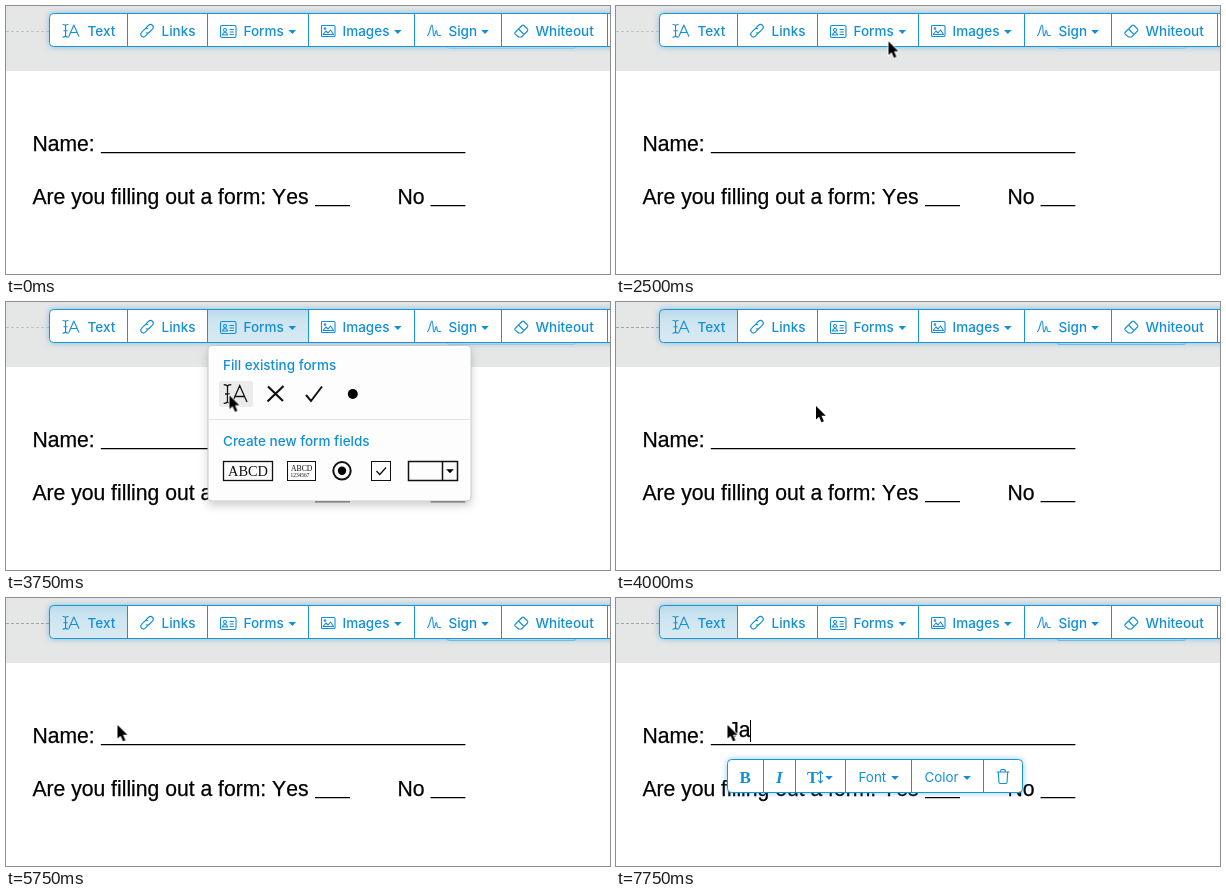
These frames come from a looping animation (604x268 px, 8 s). An HTML page:

```html
<!DOCTYPE html>
<html lang="en">
<head>
<meta charset="utf-8">
<title>Filling out a form</title>
<style>
  html, body { margin: 0; height: 100%; overflow: hidden; background: #fff; }
  svg { display: block; width: 100vw; height: 100vh; }

  .ui { font: 500 13.5px Inter, Roboto, sans-serif; fill: #128fd6; }
  .ui.sub { font-weight: 400; font-size: 13.4px; }
  .doc { font: 21.15px "Liberation Sans", Arial, sans-serif; font-kerning: none; white-space: pre; }
  .doc text { stroke: #000; stroke-width: .25; }
  .serif { font-family: "Liberation Serif", Times, serif; fill: #128fd6; }
  .line { fill: none; stroke: #128fd6; stroke-width: 1.1; stroke-linejoin: round; stroke-linecap: round; }
  .edge { fill: none; stroke: #1a95d8; }
  .dark { fill: none; stroke: #111; stroke-width: 1.3; }
  .glow { filter: drop-shadow(0 0 3px rgba(40, 155, 220, .6)); }
  .shade { filter: drop-shadow(0 4px 5px rgba(0, 0, 0, .2)); }
  #beam path { vector-effect: non-scaling-stroke; }

  /* every change is a hard cut on an 8 s clock */
  .cut { opacity: 0; animation: 8s step-end infinite; }
  .hover { animation-name: hover; }
  .pressed { animation-name: pressed; }
  .menu { animation-name: menu; }
  .pick { animation-name: pick; }
  .tool { animation-name: tool; }
  .edit { animation-name: edit; }
  .hint { animation-name: hint; }
  .key1 { animation-name: key1; }
  .key2 { animation-name: key2; }
  .pointer { animation: pointer 8s step-end infinite; }

  @keyframes hover { 0% { opacity: 0 } 34.375% { opacity: 1 } 37.5%, 100% { opacity: 0 } }
  @keyframes pressed { 0% { opacity: 0 } 37.5% { opacity: 1 } 50%, 100% { opacity: 0 } }
  @keyframes menu { 0% { opacity: 0 } 34.375% { opacity: 1 } 50%, 100% { opacity: 0 } }
  @keyframes pick { 0% { opacity: 0 } 43.75% { opacity: 1 } 50%, 100% { opacity: 0 } }
  @keyframes tool { 0% { opacity: 0 } 50%, 100% { opacity: 1 } }
  @keyframes edit { 0% { opacity: 0 } 78.125%, 100% { opacity: 1 } }
  @keyframes hint { 0% { opacity: 0 } 78.125% { opacity: 1 } 93.75%, 100% { opacity: 0 } }
  @keyframes key1 { 0% { opacity: 0 } 93.75% { opacity: 1 } 96.875%, 100% { opacity: 0 } }
  @keyframes key2 { 0% { opacity: 0 } 96.875%, 100% { opacity: 1 } }

  @keyframes pointer {
    0% { transform: translate(-40px, -40px) }
    6.25% { transform: translate(306px, 74px) }
    9.375% { transform: translate(296px, 78px) }
    12.5% { transform: translate(272px, 45px) }
    15.625% { transform: translate(272.5px, 35.5px) }
    40.625% { transform: translate(228.5px, 77px) }
    43.75% { transform: translate(223.5px, 92px) }
    46.875% { transform: translate(223.5px, 93.5px) }
    50% { transform: translate(200px, 104px) }
    53.125% { transform: translate(150px, 120px) }
    56.25% { transform: translate(117.5px, 137.5px) }
    59.375% { transform: translate(112px, 130px) }
    65.625% { transform: translate(112px, 129.5px) }
    71.875%, 100% { transform: translate(111.5px, 127px) }
  }
</style>
</head>
<body>
<svg viewBox="0 0 604 268" preserveAspectRatio="none">
  <defs>
    <linearGradient id="press" x2="0" y2="1">
      <stop offset="0" stop-color="#b9d9ea"/>
      <stop offset=".3" stop-color="#cce4f0"/>
      <stop offset="1" stop-color="#d8eaf3"/>
    </linearGradient>
    <path id="caret" d="M0 0H7.6L3.8 4Z"/>
    <g id="beam">
      <path d="M.7 .7C3 .7 4.5 1 4.5 3V17C4.5 19 3 19.3 .7 19.3M8.3 .7C6 .7 4.5 1 4.5 3M8.3 19.3C6 19.3 4.5 19 4.5 17M2 10H7M9.5 18L16.7 1.5L24 18M12 12.5H21.5"/>
    </g>
  </defs>

  <!-- page -->
  <rect width="604" height="268" fill="#fff"/>
  <rect width="604" height="65" fill="#e5e6e6"/>
  <path d="M0 25.5H43" stroke="#c3c3c3" stroke-dasharray="3 2"/>
  <path d="M441 41.5Q442 42.5 445 42.5H566Q569 42.5 570 41.5" fill="none" stroke="#b4d3e5"/>
  <g class="cut tool">
    <path d="M0 25.5H43" stroke="#a2a4a5" stroke-dasharray="3 2"/>
    <path d="M441 41.5Q442 42.5 445 42.5H566Q569 42.5 570 41.5" fill="none" stroke="#84bfe2"/>
  </g>

  <g class="doc">
    <text x="26.4" y="145">Name:</text>
    <text x="26.4" y="198">Are you filling out a form: Yes</text>
    <text x="391.5" y="198">No</text>
    <path d="M94.8 146.6H459.4M309 199.6H344M424.5 199.6H459.4" stroke="#000" stroke-width="1.4"/>
  </g>

  <!-- main toolbar -->
  <rect class="glow" x="43.5" y="7.5" width="580" height="33" rx="4" fill="#fff"/>
  <path class="cut tool" d="M121.5 7.5H47.5Q43.5 7.5 43.5 11.5V36.5Q43.5 40.5 47.5 40.5H121.5Z" fill="url(#press)"/>
  <rect class="cut hover" x="201.5" y="7.5" width="101" height="33" fill="#e4eff5"/>
  <rect class="cut pressed" x="201.5" y="7.5" width="101" height="33" fill="url(#press)"/>
  <rect class="edge" x="43.5" y="7.5" width="580" height="33" rx="4"/>
  <path class="edge" d="M121.5 8V40M201.5 8V40M302.5 8V40M408.5 8V40M495.5 8V40M601.5 8V40"/>

  <g class="line">
    <use href="#beam" transform="translate(56.5 18) scale(.68)"/>
    <g transform="translate(141 24.7) rotate(-45)">
      <path d="M1.5 -2.7H5A2.7 2.7 0 0 1 5 2.7H.5A2.7 2.7 0 0 1 -2 1"/>
      <path d="M-1.5 2.7H-5A2.7 2.7 0 0 1 -5 -2.7H-.5A2.7 2.7 0 0 1 2 -1"/>
    </g>
    <rect x="214.5" y="19.5" width="15.5" height="12" rx="1.5"/>
    <circle cx="219" cy="24" r="1.5"/>
    <path d="M216.5 29Q217 26.5 219 26.5T221.5 29ZM224 23.5H227.5M224 26H227.5M224 28.5H227.5"/>
    <rect x="315.5" y="19.5" width="13.5" height="11" rx="1"/>
    <path d="M317 28.5L320 25L322 27L324.5 24L327.5 28.5Z"/>
    <circle cx="319" cy="22.5" r=".8"/>
    <path d="M421.5 29.5C423.5 29 424.5 19 426 19S426.5 30 428 30S429 24.5 430.3 24.5S430.5 29.5 432 29.5H434.5"/>
    <path d="M509 26.5L516 19.5Q517 18.7 518 19.5L521.5 23Q522.3 24 521.5 25L515.5 31H512.5L509 27.8Q508.5 27 509 26.5ZM512.5 23L518 28.5"/>
  </g>
  <g class="ui">
    <text x="81.5" y="30">Text</text>
    <text x="155.5" y="30">Links</text>
    <text x="237.5" y="30">Forms</text>
    <text x="336.5" y="30">Images</text>
    <text x="442.5" y="30">Sign</text>
    <text x="529.5" y="30">Whiteout</text>
    <use href="#caret" x="282.5" y="24"/>
    <use href="#caret" x="388" y="24"/>
    <use href="#caret" x="475.2" y="24"/>
  </g>

  <!-- forms menu -->
  <g class="cut menu">
    <rect class="shade" x="202" y="44" width="263" height="155.3" rx="4" fill="#fff"/>
    <rect x="202" y="43.5" width="263" height="155.5" rx="4" fill="#fdfdfd" stroke="#c9cccd"/>
    <path d="M203 117.5H464" stroke="#e3e3e3"/>
    <g class="ui">
      <text x="217" y="68">Fill existing forms</text>
      <text x="217" y="144">Create new form fields</text>
    </g>
    <rect class="cut pick" x="213" y="79" width="34" height="26" rx="2" fill="#ebebeb"/>
    <g class="dark">
      <use href="#beam" x="217" y="82"/>
      <path d="M262 84.5L277 99M277.5 84L261.5 99.5" stroke-width="2.2"/>
      <path d="M300 93L305 99L316 84.5" stroke-width="2"/>
      <rect x="217.5" y="159.5" width="49" height="19"/>
      <rect x="281.5" y="159.5" width="28" height="19" stroke-width="1"/>
      <circle cx="336" cy="168.8" r="8.7" stroke-width="2"/>
      <rect x="365.5" y="159.5" width="19" height="19" stroke-width="1"/>
      <path d="M370.5 169L373.8 172.5L380 165.5"/>
      <path d="M402.5 159.5H451.5V178.5H402.5ZM436.5 159.5V178.5" stroke-width="1.5"/>
    </g>
    <circle cx="346.8" cy="92" r="5"/>
    <circle cx="336" cy="168.8" r="4.2"/>
    <use href="#caret" x="440.2" y="167.3"/>
    <g class="serif" style="fill:#111">
      <text x="222" y="174.3" font-size="14.4">ABCD</text>
      <text x="285" y="169.3" font-size="7.7">ABCD</text>
      <text x="284.5" y="175" font-size="5.4">1234567</text>
    </g>
  </g>

  <!-- text being edited -->
  <g class="doc">
    <g class="cut hint">
      <rect x="113" y="122" width="133" height="22" fill="#9bc8ef"/>
      <text x="112.6" y="139">Type your text</text>
    </g>
    <g class="cut key1">
      <text x="112.3" y="139">J</text>
      <path d="M123.5 122V144" stroke="#000"/>
    </g>
    <g class="cut key2">
      <text x="112.3" y="139">Ja</text>
      <path d="M134.5 122V144" stroke="#000"/>
    </g>
  </g>

  <!-- formatting bar -->
  <g class="cut edit">
    <rect class="glow" x="111.5" y="161.5" width="295" height="33" rx="4" fill="#fff"/>
    <rect class="edge" x="111.5" y="161.5" width="295" height="33" rx="4"/>
    <path class="edge" d="M147.5 162V194M179.5 162V194M229.5 162V194M295.5 162V194M367.5 162V194"/>
    <g class="serif" font-size="17">
      <text x="123.5" y="185" font-weight="bold">B</text>
      <text x="160" y="185" font-style="italic" font-weight="bold">I</text>
      <text x="191" y="185" font-size="16.5" font-weight="bold">T</text>
    </g>
    <path class="line" d="M204.5 174V184M202.5 175.5L204.5 173.2L206.5 175.5M202.5 182.7L204.5 185L206.5 182.7"/>
    <g class="ui sub">
      <text x="242.5" y="184">Font</text>
      <text x="308.5" y="184">Color</text>
      <use href="#caret" x="209.2" y="178"/>
      <use href="#caret" x="275.2" y="178"/>
      <use href="#caret" x="347.2" y="178"/>
    </g>
    <path class="line" d="M381 174H393M384.7 173.8V172.5Q384.7 171.5 385.7 171.5H388.3Q389.3 171.5 389.3 172.5V173.8M382.3 174.5L383 184.5Q383.1 185.5 384 185.5H390Q390.9 185.5 391 184.5L391.7 174.5"/>
  </g>

  <g class="pointer">
    <path d="M0 0V13.6L3.1 10.7L5.5 16.2L7.9 15.2L5.5 9.8H9.8Z" fill="#000" stroke="#fff" stroke-width="1.8" paint-order="stroke"/>
  </g>
</svg>
</body>
</html>
```
